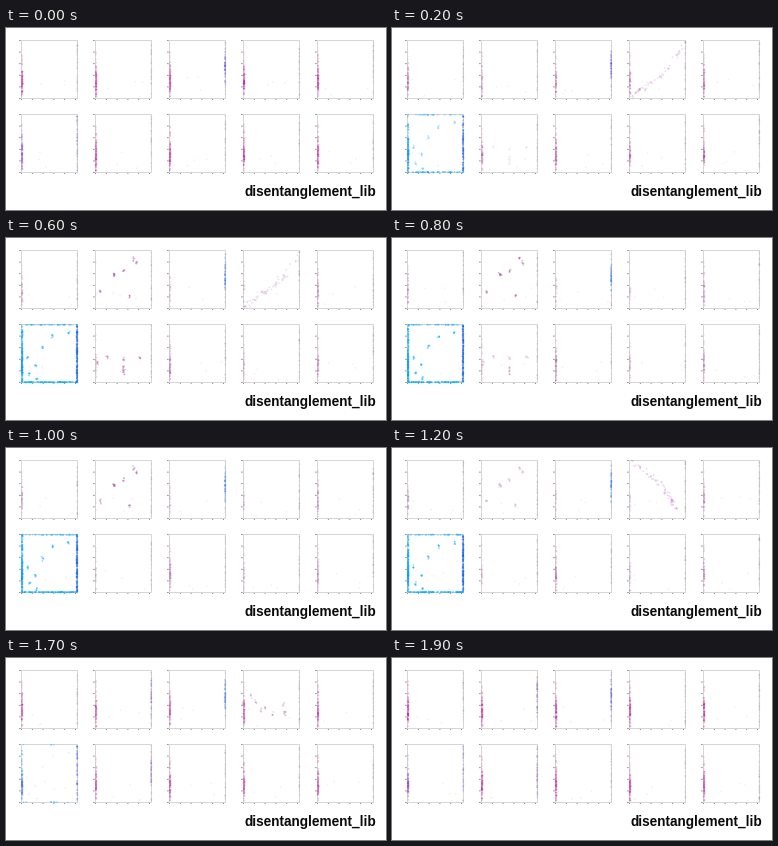
These frames come from a looping animation (380 by 182 pixels, 2000 ms). A matplotlib script:

```python
import numpy as np
import matplotlib.pyplot as plt
from matplotlib.animation import FuncAnimation
from matplotlib.colors import to_rgb

W, H, DPI = 380, 182, 100
FRAMES, INTERVAL = 20, 100
PX = 72 / DPI
BOX_W, BOX_H = 56, 58

PANELS = [(15.5 + 74 * c, 12.5 + 74 * r) for r in range(2) for c in range(5)]
SCATTER, CURVE, BLUE, SPREAD = 1, 3, 5, 6     # panels with their own inner marks
RIGHT_BLUE = 2

# How far each left smear sinks in mid-loop, and how strong each right one is
DIP = [.5, .95, .7, .75, .4, 0, .7, .2, .6, .35]
RIGHT = [.25, .15, .75, .2, .25, 1, .15, .15, .12, .25]


def ease(t, a, b):
    u = np.clip((t - a) / (b - a), 0, 1)
    return u * u * (3 - 2 * u)


def pulse(t, start, full, fall, end):
    return ease(t, start, full) * (1 - ease(t, fall, end))


def mix(a, b, t):
    return (1 - t) * np.array(to_rgb(a)) + t * np.array(to_rgb(b))


class Dabs:
    """Collects the small soft dots of one frame."""

    def __init__(self):
        self.pos, self.rgba, self.area = [], [], []

    def add(self, x, y, color, alpha, size=1.7):
        pos = np.column_stack(np.broadcast_arrays(x, y))
        n = len(pos)
        self.pos.append(pos)
        self.rgba.append(np.tile([*to_rgb(color), min(alpha, 1)], (n, 1)))
        self.area.append(np.full(n, (size * PX) ** 2))


def left_edge(dabs, panel, frame, rng):
    x0, y0 = PANELS[panel]
    rest = pulse(frame, 0, 4, 12, 19)
    s = .9 * (1 - DIP[panel] * rest)
    core = mix("#c01898", "#a4509c", rest)
    tail = mix("#dc88ac", "#cda6bc", rest)
    if panel == BLUE:
        azure = pulse(frame, -1, 3, 15, 20)
        core = mix("#9a28c0", "#0a70ff", azure)
        tail = mix("#c890d0", "#20b4ff", azure)
    n = int(80 * s)
    y = np.clip(rng.normal(.7 * BOX_H, 7.5, n), 2, BOX_H - 2)
    dabs.add(x0 + .1 + rng.random(n), y0 + y, core, .1 + .16 * s)
    n = int(24 * s)
    dabs.add(x0 + .2 + .6 * rng.random(n), y0 + rng.uniform(10, 42, n), tail, .25)


def right_edge(dabs, panel, frame, rng):
    x1, y0 = PANELS[panel][0] + BOX_W, PANELS[panel][1]
    dabs.add(x1 - .4 * rng.random(22), y0 + rng.uniform(1, BOX_H - 3, 22), "#8c8490", .16)
    s, color, spread = RIGHT[panel], "#a88898", 12
    if panel in (SCATTER, SPREAD):
        s += .45 * ease(frame, 11, 17)
        color = mix("#a88898", "#7c3cb8", ease(frame, 11, 15))
    if panel == RIGHT_BLUE:
        color, spread = mix("#4b40e0", "#2078f0", pulse(frame, 2, 8, 16, 20)), 8
    if panel == BLUE:
        azure = pulse(frame, -1, 3, 14, 20)
        s = .5 + .5 * azure
        color, spread = mix("#7858d8", "#0c58f4", azure), 20
    n = int(60 * s)
    y = np.clip(rng.normal(.46 * BOX_H, spread, n), 2, BOX_H - 2)
    dabs.add(x1 - .7 * rng.random(n), y0 + y, color, .08 + .2 * s)


def blue_box(dabs, frame, rng):
    x0, y0 = PANELS[BLUE]
    s = pulse(frame, 0, 4, 12, 18)
    n = int(110 * s)
    sky = "#00a8ff"
    along_x = x0 + rng.uniform(0, BOX_W, n)
    along_y = y0 + rng.uniform(0, BOX_H, n)
    dabs.add(along_x, y0 + BOX_H - .8 * rng.random(n), sky, .42)
    dabs.add(along_x[::2], y0 + .6 * rng.random(len(along_x[::2])), sky, .3)
    dabs.add(x0 + .2 + rng.random(n), along_y, sky, .42)
    dabs.add(x0 + BOX_W - rng.random(n), along_y, "#0c60f4", .35)
    spots(dabs, BLUE, [(21, 23), (6, 33), (14, 41), (15, 54), (8, 49), (47, 8), (31, 12)],
          "#18b0ff", .5 * s, rng)


def spots(dabs, panel, points, color, alpha, rng):
    x0, y0 = PANELS[panel]
    if alpha < .02:
        return
    for x, y in points:
        dabs.add(x0 + x + rng.normal(0, .5, 5), y0 + y + rng.normal(0, 1, 5), color, alpha)


def curve(dabs, points, color, strength, loose, rng):
    x0, y0 = PANELS[CURVE]
    n = int(230 * strength)
    px, py = np.array(points, float).T
    t = rng.uniform(0, len(px) - 1, n)
    step = np.arange(len(px))
    x = np.interp(t, step, px) + rng.normal(0, .6 + loose, n)
    y = np.interp(t, step, py) + np.sin(t * 9) + rng.normal(0, .6 + loose, n)
    dabs.add(x0 + np.clip(x, 0, BOX_W), y0 + np.clip(y, 0, BOX_H), color,
             .12 + .28 * strength, 1.8)


def inner_marks(dabs, frame, rng):
    spots(dabs, SCATTER, [(18, 24), (28, 20), (19, 25), (38, 8), (5, 41), (34, 45), (41, 12)],
          "#9a4c94", .36 * pulse(frame, 2, 6, 10, 14), rng)
    spots(dabs, SPREAD, [(28, 34), (28, 43), (28, 46), (28, 49), (2, 38), (12, 32), (45, 33)],
          "#a84890", .34 * pulse(frame, 1, 5, 6, 10), rng)

    rising = [(1, 57), (16, 45), (30, 37), (42, 24), (56, 0)]
    curve(dabs, rising, "#b05cb4", pulse(frame, 1, 4, 4, 7), .4 * abs(frame - 4), rng)
    falling = [(1, 0), (20, 15), (33, 27), (41, 39), (49, 50)]
    curve(dabs, falling, "#a42cb8", pulse(frame, 11, 14, 14, 17), .4 * abs(frame - 14), rng)

    cloud = np.random.default_rng(8).normal((30, 34), (13, 6), (9, 2))
    spots(dabs, CURVE, cloud, "#985a80", .22 * pulse(frame, 14, 16, 17, 19), rng)


def stray(dabs, panel, rng):
    x0, y0 = PANELS[panel]
    dabs.add(x0 + rng.uniform(4, BOX_W - 3, 3), y0 + rng.uniform(36, BOX_H - 2, 3),
             "#b0a8ac", .15)


def draw_axes(x, y):
    ax.add_patch(plt.Rectangle((x, y), BOX_W, BOX_H, fill=False, ec="#d2d2d2",
                               lw=.9 * PX, snap=False))
    style = dict(color="#606060", lw=.8 * PX, snap=False, solid_capstyle="butt")
    for v in np.linspace(0, 1, 6):
        ty, tx = y + v * BOX_H, x + v * (BOX_W - 2)
        ax.plot([x - 2.3, x - .9], [ty, ty], **style)
        ax.plot([tx, tx], [y + BOX_H + .5, y + BOX_H + 1.4], **style)


fig = plt.figure(figsize=(W / DPI, H / DPI), dpi=DPI, facecolor="white")
ax = fig.add_axes([0, 0, 1, 1])
ax.set_xlim(0, W)
ax.set_ylim(H, 0)
ax.axis("off")
for corner in PANELS:
    draw_axes(*corner)
ax.text(370.3, 168, "disentanglement_lib", ha="right", va="baseline", color="#0a0a0a",
        family="Liberation Sans", weight="bold", size=13.6 * PX)
marks = ax.scatter([], [], marker="o", linewidths=0, zorder=3, snap=False)


def draw(frame):
    dabs = Dabs()
    for panel in range(len(PANELS)):
        rng = np.random.default_rng(100 * panel + frame)
        left_edge(dabs, panel, frame, rng)
        right_edge(dabs, panel, frame, rng)
        stray(dabs, panel, rng)
    rng = np.random.default_rng(5000 + frame)
    blue_box(dabs, frame, rng)
    inner_marks(dabs, frame, rng)
    marks.set_offsets(np.vstack(dabs.pos))
    marks.set_facecolors(np.vstack(dabs.rgba))
    marks.set_sizes(np.concatenate(dabs.area))
    return (marks,)


def reset():
    return draw(0)


anim = FuncAnimation(fig, draw, frames=FRAMES, init_func=reset, interval=INTERVAL,
                     repeat=True, repeat_delay=0, blit=False)
plt.show()
```
